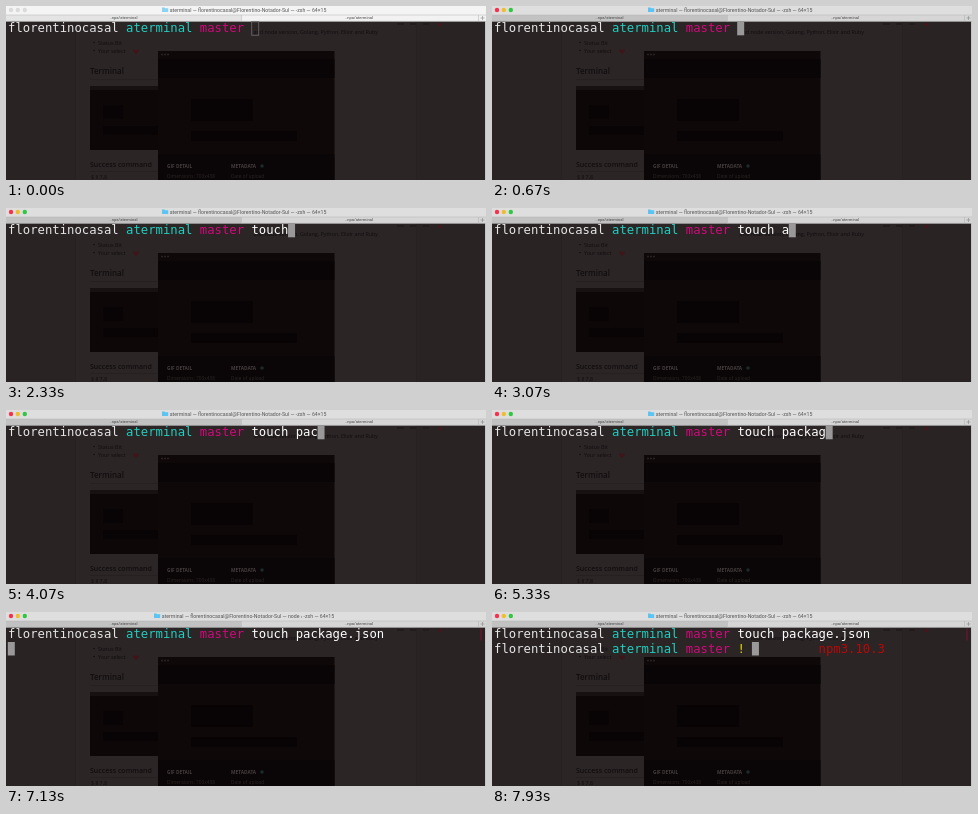
Recreate the animation shown at these times as an HTML page. Size 480 by 174 pixels, loop 8000 ms.

```html
<!DOCTYPE html>
<html lang="en">
<head>
<meta charset="utf-8">
<title>Terminal</title>
<style>
  html, body { margin: 0; width: 100%; height: 100%; overflow: hidden; background: #2a2425; }
  svg { display: block; width: 480px; height: 174px; }
  text { white-space: pre; }
  .term { font: 12.25px "DejaVu Sans Mono", monospace; fill: #e6e6e6; }
  .dir { fill: #20d0c0; }
  .branch { fill: #d4087c; }
  .dirty { fill: #e6dc00; }
  .version { fill: #b90808; }
  #typed { fill: #fff; }
  .bar { font: 5.2px Roboto, sans-serif; fill: #555; text-anchor: middle; }
  .tab { font-size: 4.1px; fill: #444; }
  .page { font: 5.4px "Open Sans", sans-serif; fill: #120d0e; }
  .head { font-size: 8px; font-weight: 600; }
  .sub { font-size: 7px; font-weight: 600; }
  .inner { font-size: 4.8px; fill: #2c2627; }
  .label { font-weight: 700; fill: #463f40; }
</style>
</head>
<body>
<svg viewBox="0 0 480 174">
  <!-- page showing through the window -->
  <rect width="480" height="174" fill="#292324"/>
  <rect x="69" y="15" width="341" height="159" fill="#2b2526"/>
  <path d="M69.5 15V174M410.5 15V174" stroke="#272122"/>
  <g class="page">
    <text x="372" y="28" text-anchor="end">and node version, Golang, Python, Elixir and Ruby</text>
    <circle cx="88" cy="36.5" r=".8"/>
    <circle cx="88" cy="44.5" r=".8"/>
    <text x="92" y="38.5">Status Bit</text>
    <text x="92" y="46.5">Your select</text>
    <path d="M130 48l-3-3q0-2.500 3-1 3-1.500 3 1z" fill="#401419"/>
    <text class="head" x="84" y="67.5">Terminal</text>
    <text class="sub" x="84" y="161">Success command</text>
    <text x="85" y="173">$ ll 7,8</text>
  </g>
  <path d="M84 73.5H152M84 165.5H152" stroke="#262021"/>
  <path d="M84 80h70v64H84z" fill="#0d0708"/>
  <path d="M84 80h70v4H84z" fill="#171112"/>
  <path d="M97 99h20v14H97zM97 120h55v9H97z" fill="#080304"/>
  <path d="M391 18h7M404 18h6M417 18h6" stroke="#221c1d" stroke-width="2"/>
  <circle cx="434.500" cy="18.500" r="1.800" fill="#48161e"/>
  <path d="M152 45h176.500v129H152z" fill="#0e0809"/>
  <path d="M152 53h176.500v19H152z" fill="#090405"/>
  <path d="M185 93h62v22h-62zM185 125h106v10H185z" fill="#080304"/>
  <path d="M155 48.500h8" stroke="#2a2223" stroke-width="1.500" stroke-dasharray="2 1"/>
  <path d="M152 148h176.500v26H152z" fill="#0a0506"/>
  <g class="page inner">
    <text class="label" x="161" y="162">GIF DETAIL</text>
    <text class="label" x="225" y="162">METADATA</text>
    <circle cx="256" cy="160" r="1.800" fill="#1c2a2a"/>
    <text x="161" y="172">Dimensions: 700x438</text>
    <text x="225" y="172">Date of upload</text>
  </g>

  <!-- window chrome -->
  <rect id="titleBar" width="480" height="9"/>
  <rect id="leftTab" y="9" width="235" height="6.500"/>
  <rect id="rightTab" x="235" y="9" width="245" height="6.500"/>
  <path d="M0 9H480M0 15.300H480M235.500 9v6.500M472.500 9v6.500" stroke="#b0b0b0" stroke-width=".5"/>
  <path d="M474.500 12h4M476.500 10v4" stroke="#888" stroke-width=".6"/>
  <path d="M479.500 15V174" stroke="#c4c4c4"/>
  <g id="lights"><circle cx="5" cy="4" r="2.200"/><circle cx="11.800" cy="4" r="2.200"/><circle cx="18.800" cy="4" r="2.200"/></g>
  <path id="folder" d="M0 1.500h2.500l.7.800H6.200V6H0z" fill="#5cc4f2"/>
  <text id="title" class="bar" x="242" y="5.600"></text>
  <text class="bar tab" x="117.500" y="13.300">..npa/aterminal</text>
  <text class="bar tab" x="353" y="13.300">..npa/aterminal</text>

  <!-- terminal content -->
  <rect id="cursor" width="7" height="13.500"/>
  <text class="term" x="2" y="26.300">florentinocasal <tspan class="dir">aterminal</tspan> <tspan class="branch">master</tspan> <tspan id="typed"></tspan></text>
  <path id="edge" d="M475 16.500v12" stroke="#85102f"/>
  <g id="nextPrompt" class="term">
    <text x="2" y="40.600">florentinocasal <tspan class="dir">aterminal</tspan> <tspan class="branch">master</tspan> <tspan class="dirty">!</tspan></text>
    <text class="version" x="326.500" y="40.600">npm3.10.3</text>
  </g>
</svg>
<script>
  const LOOP = 8000, FOCUS = 500, ENTER = 6830, PROMPT = 7400;
  const COLUMN = 7.375, PROMPT_COLUMNS = 33;
  // "<" stands for backspace
  const KEYS = "touch a<package.json";
  const KEY_TIMES = [1050, 1250, 1480, 1800, 2050, 2400, 2900, 3250, 3450, 3700,
    3950, 4300, 4650, 5100, 5500, 5800, 6000, 6200, 6350, 6500];
  const LIGHTS = ["#f8304c", "#efbd30", "#30c840"];
  const $ = id => document.getElementById(id);
  const set = (node, attrs) => {
    for (const name in attrs) node.setAttribute(name, attrs[name]);
  };
  const show = (id, visible) => set($(id), { visibility: visible ? "visible" : "hidden" });

  function typedAt(time) {
    let text = "";
    KEY_TIMES.forEach((at, i) => {
      if (time >= at) text = KEYS[i] === "<" ? text.slice(0, -1) : text + KEYS[i];
    });
    return text;
  }

  function draw(time) {
    const focused = time >= FOCUS, entered = time >= ENTER, done = time >= PROMPT;
    const running = entered && !done;
    const text = typedAt(time);
    $("typed").textContent = text;

    const column = done ? 35 : entered ? 0 : PROMPT_COLUMNS + text.length;
    set($("cursor"), {
      x: 1.8 + column * COLUMN + (focused ? 0 : .5),
      y: entered ? 30 : 15.8,
      fill: focused ? "#9a9899" : "none",
      stroke: focused ? "none" : "#625d5e"
    });

    const paint = (id, active, inactive) => set($(id), { fill: focused ? active : inactive });
    paint("titleBar", "#dedede", "#f4f4f4");
    paint("leftTab", "#c2c2c2", "#e4e4e4");
    paint("rightTab", "#d6d6d6", "#f2f2f2");
    paint("title", "#555", "#a4a4a4");
    [...$("lights").children].forEach((light, i) => set(light, { fill: focused ? LIGHTS[i] : "#dadada" }));
    set($("folder"), { transform: `translate(${running ? 148 : 156} 0)`, opacity: focused ? 1 : .7 });
    $("title").textContent = "aterminal — florentinocasal@Florentino-Notador-Sul — "
      + (running ? "node ‹ " : "") + "-zsh — 64×15";

    show("edge", entered);
    show("nextPrompt", done);
  }

  const start = performance.now();
  function tick() {
    draw((performance.now() - start) % LOOP);
    requestAnimationFrame(tick);
  }
  tick();
</script>
</body>
</html>
```
